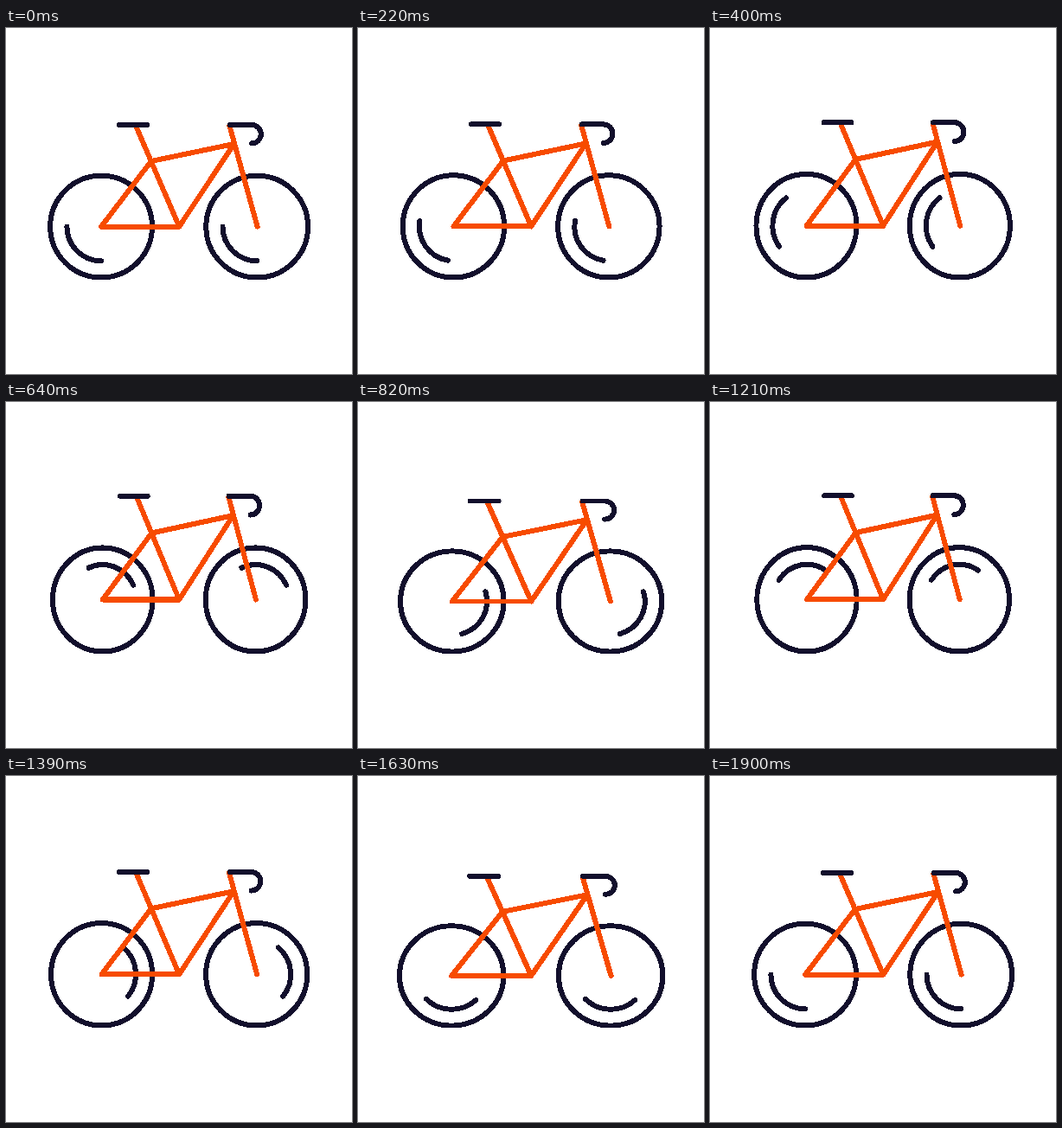
An HTML page that plays this animation: 400x400 px, repeating every 1990 ms.

```html
<!DOCTYPE html>
<html lang="en">
<head>
<meta charset="utf-8">
<title>Bicycle</title>
<style>
  html, body { margin: 0; width: 100%; height: 100%; overflow: hidden; background: #fff; }
  svg { display: block; width: 100vw; height: 100vh; shape-rendering: crispEdges; }
  #bike { fill: none; stroke-width: 6; stroke-linecap: round; stroke-linejoin: round; }
  .dark { stroke: #120f2c; }
  .frame { stroke: #f74b00; }
</style>
</head>
<body>
<svg viewBox="0 0 400 400">
  <defs>
    <g id="wheel">
      <circle r="58.9"/>
      <path class="glint" d="M-39.7 0A39.7 39.7 0 0 0 0 39.7"/>
    </g>
  </defs>
  <g id="bike">
    <g class="dark">
      <use href="#wheel" x="110.1" y="229.6"/>
      <use href="#wheel" x="290.2" y="229.6"/>
    </g>
    <g class="frame">
      <path d="M150.1 113L200.2 229.6H110.1L167.8 154L263.7 134L200.2 229.6"/>
      <path d="M258.4 113L290.6 229.6"/>
    </g>
    <g class="dark">
      <path d="M130.7 112H163"/>
      <path d="M258.8 112H284.1a10.7 10.7 0 0 1 0 21.4"/>
    </g>
  </g>
</svg>
<script>
  const LOOP = 1990, START = 100, STEP = 30, STEPS = 60, TURN = 720;
  // Squash (+) and stretch (-) keys: [step, amount]
  const KEYS = [[0, 0], [16, -0.022], [27, 0.022], [38, -0.022], [50, 0.022], [60, 0]];
  const bike = document.getElementById('bike');
  const glint = document.querySelector('.glint');

  const ease = u => u * u * (3 - 2 * u);

  function squashAt(step) {
    const i = Math.max(1, KEYS.findIndex(key => key[0] >= step));
    const [a, from] = KEYS[i - 1], [b, to] = KEYS[i];
    return from + (to - from) * ease((step - a) / (b - a));
  }

  function draw(now) {
    const t = now % LOOP;
    const step = Math.min(STEPS, Math.max(0, Math.floor((t - START) / STEP)));
    const s = squashAt(step);
    glint.setAttribute('transform', `rotate(${TURN * ease(step / STEPS)})`);
    // Scale about the ground point so the tyres stay planted
    bike.setAttribute('transform',
      `translate(200 291.4) scale(${1 + s} ${1 - s}) translate(-200 -291.4)`);
  }

  function tick() {
    draw(performance.now());
    requestAnimationFrame(tick);
  }
  tick();
</script>
</body>
</html>
```
